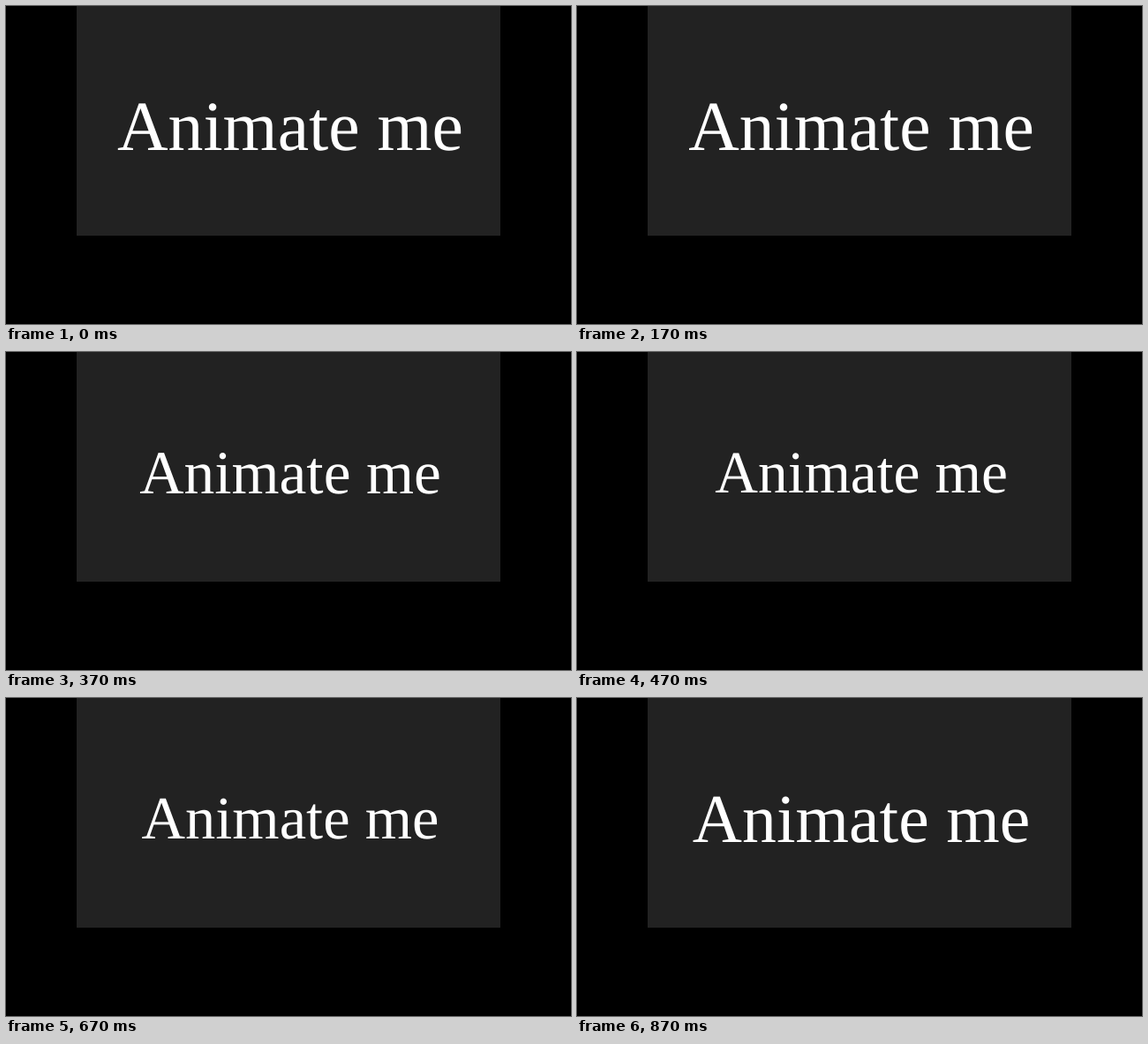
Write an HTML page that moves like this. It is 640 by 360 pixels and loops after 0.91 s.

```html
<!DOCTYPE html>
<html lang="en">
<head>
<meta charset="utf-8">
<title>Animate me</title>
<style>
  html, body { margin: 0; width: 100%; height: 100%; overflow: hidden; background: #000; }
  svg { display: block; width: 640px; height: 360px; }
  text { font: 66.8px "Liberation Serif", "Times New Roman", serif; fill: #fff; text-anchor: middle; text-rendering: geometricPrecision; }
  #soft { filter: blur(.45px); }
</style>
</head>
<body>
<svg viewBox="0 0 640 360">
  <rect x="80" width="480" height="260" fill="#222"/>
  <g id="soft"><text id="label" y="22.5">Animate me</text></g>
</svg>
<script>
  const LOOP = 910, FRAMES = 27;
  const SHRINK = 147, SHRINK_MS = 450;
  const GROW = 609, GROW_MS = 500;
  const label = document.getElementById('label');

  // cubic-bezier(.25, .1, .25, 1)
  const bezier = (a, b, u) => 3 * a * u * (1 - u) ** 2 + 3 * b * u * u * (1 - u) + u ** 3;
  function ease(x) {
    if (x <= 0) return 0;
    if (x >= 1) return 1;
    let lo = 0, hi = 1;
    for (let i = 0; i < 24; i++) {
      const mid = (lo + hi) / 2;
      if (bezier(.25, .25, mid) < x) lo = mid; else hi = mid;
    }
    return bezier(.1, 1, lo);
  }

  // Pulse between 1 and 1.2; the loop opens near the end of a growth
  function scaleAt(t) {
    const p = t < SHRINK ? ease((t + 1000 - GROW) / GROW_MS)
      : t < GROW ? 1 - ease((t - SHRINK) / SHRINK_MS)
      : ease((t - GROW) / GROW_MS);
    return 1 + .2 * p;
  }

  // 30 fps steps, rounded to 10 ms
  const stepTime = n => Math.round(n * 10 / 3) * 10;
  function snap(t) {
    let n = FRAMES - 1;
    while (n > 0 && stepTime(n) > t) n--;
    return stepTime(n);
  }

  function draw(now) {
    const s = scaleAt(snap((now - start) % LOOP));
    label.setAttribute('transform', `translate(322 136.3) scale(${s.toFixed(4)})`);
  }

  const start = performance.now();
  function tick() {
    draw(performance.now());
    requestAnimationFrame(tick);
  }
  tick();
</script>
</body>
</html>
```
